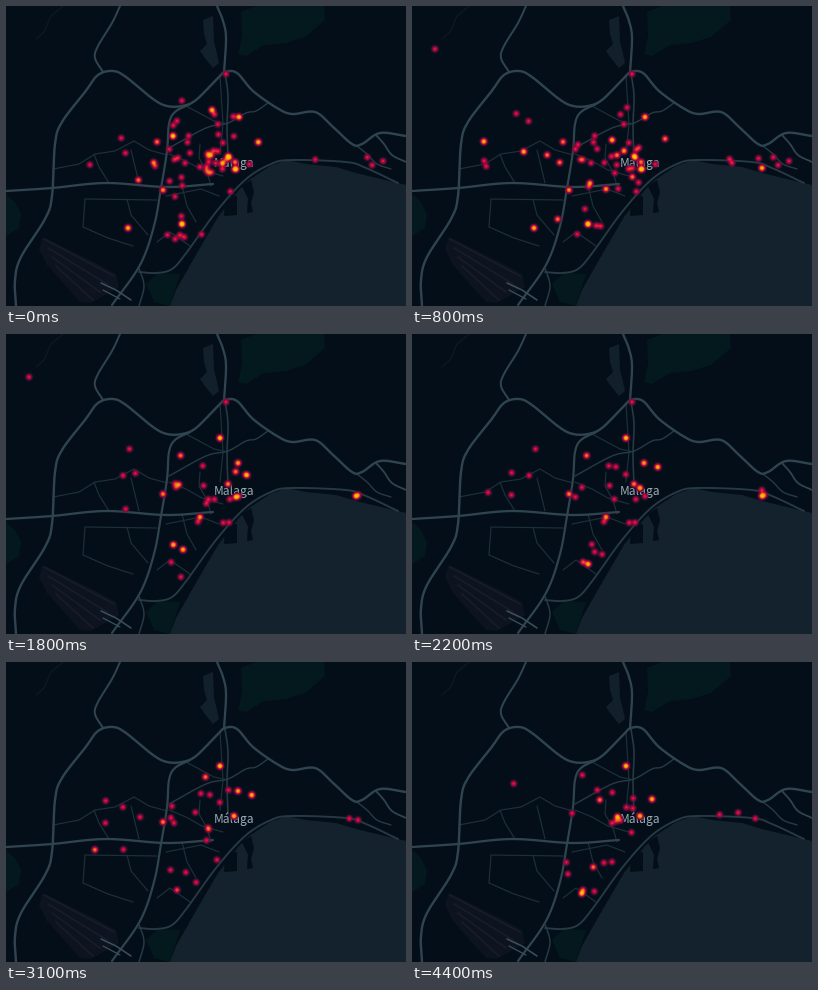
Write a matplotlib script that moves like this. It is 400 by 300 pixels and loops after 4500 ms.

```python
import random

import matplotlib.pyplot as plt
import numpy as np
from matplotlib.animation import FuncAnimation
from matplotlib.colors import LinearSegmentedColormap, to_rgba
from matplotlib.patches import Polygon

W, H, DPI = 400, 300, 100
FRAMES, STEP = 45, 100
PX = 72 / DPI

LAND, SEA, PARK = "#030e18", "#13222d", "#03191d"
MOTORWAY, AVENUE, STREET = "#2f444f", "#263a45", "#1d303a"
PEAK, SIGMA = 2.6, 1.95

random.seed(29)
fig = plt.figure(figsize=(W / DPI, H / DPI), dpi=DPI, facecolor=LAND)
ax = fig.add_axes([0, 0, 1, 1])
ax.set_xlim(0, W)
ax.set_ylim(H, 0)
ax.axis("off")


def smooth(points, n=8):
    """Catmull-Rom curve through the points."""
    p = np.array(points, float)
    p = np.vstack([2 * p[0] - p[1], p, 2 * p[-1] - p[-2]])
    t = np.linspace(0, 1, n, endpoint=False)[:, None]
    parts = []
    for a, b, c, d in zip(p, p[1:], p[2:], p[3:]):
        parts.append(0.5 * (2 * b + (c - a) * t + (2 * a - 5 * b + 4 * c - d) * t**2
                            + (3 * b - a - 3 * c + d) * t**3))
    return np.vstack(parts + [p[-2:-1]])


def area(color, *points):
    ax.add_patch(Polygon(points, closed=True, fc=color, lw=0, zorder=1))


def line(color, width, *points, z=3):
    x, y = np.array(points, float).T
    ax.plot(x, y, color=color, lw=width * PX, solid_capstyle="round",
            solid_joinstyle="round", zorder=z)


def road(color, width, *points):
    line(color, width, *smooth(points))


def street(*points):
    line(STREET, 1.2, *points)


def draw_land():
    area(PARK, (235, 6), (250, 0), (318, 0), (319, 14), (299, 31), (280, 37),
         (258, 39), (240, 50), (232, 48), (236, 30))
    area(PARK, (0, 188), (9, 196), (15, 208), (13, 222), (0, 230))
    area(PARK, (140, 278), (152, 267), (174, 268), (164, 300), (148, 296))
    line("#0f1c26", 1, (30, 33), (38, 26), (45, 10), (57, 0), z=1)
    # reservoir
    area("#11202a", (197, 14), (207, 10), (208, 35), (213, 57), (207, 62),
         (198, 51), (194, 45), (201, 38), (198, 28))
    # airport with its runways
    area("#0d1420", (37, 231), (88, 256), (110, 268), (113, 281), (85, 297),
         (74, 296), (41, 259), (33, 243))
    for k in range(4):
        line("#191d29", 1.6, (38 + 4 * k, 233 + 9 * k), (108 - 7 * k, 270 + 8 * k), z=2)
    area(SEA, (164, 300), (170, 284), (191, 247), (212, 211), (233, 184), (243, 174),
         (264, 160), (281, 154), (300, 158), (330, 161), (350, 167), (400, 179), (400, 300))
    # harbour quays
    area(LAND, (219, 191), (231, 190), (231, 209), (218, 210))
    area(LAND, (236, 180), (245, 174), (248, 186), (245, 197), (247, 206), (241, 207),
         (242, 193))


def draw_roads():
    street((47, 163), (73, 158), (89, 148), (109, 145), (128, 135), (143, 144), (161, 149))
    street((88, 148), (93, 161), (103, 177))
    street((125, 144), (133, 177))
    street((151, 194), (79, 193), (77, 221), (102, 232), (127, 240))
    street((121, 193), (125, 209), (142, 229))
    street((163, 148), (180, 155), (196, 164), (217, 170))
    street((194, 138), (193, 152), (201, 166), (205, 180))
    street((151, 236), (164, 226), (184, 240))
    street((160, 190), (195, 183), (213, 190))
    street((176, 180), (181, 200), (190, 216))
    street((214, 70), (217, 118), (214, 148))
    street((180, 100), (208, 115), (222, 118))
    road(AVENUE, 1.4, (163, 142), (200, 122), (222, 117), (240, 107), (250, 105), (262, 97))
    road(AVENUE, 1.6, (219, 67), (222, 90), (221, 120), (222, 152))
    road(AVENUE, 1.4, (351, 140), (361, 148), (371, 158), (385, 163))
    road(AVENUE, 1.9, (133, 266), (150, 267), (166, 263), (181, 246), (210, 206),
         (239, 174), (265, 158), (286, 154), (340, 156), (360, 162), (392, 177))
    # western ring, then on to the east
    road(MOTORWAY, 2.4, (10, 300), (9, 274), (15, 251), (39, 213), (46, 190),
         (49, 138), (56, 116), (79, 86), (92, 69), (107, 65), (120, 71), (147, 93),
         (161, 100), (176, 100), (190, 94), (211, 73), (219, 66), (231, 67), (247, 85),
         (271, 102), (286, 108), (309, 106), (326, 120), (346, 138), (356, 138),
         (374, 127), (400, 130))
    road(MOTORWAY, 2, (114, 0), (106, 17), (92, 40), (89, 52), (97, 66))
    road(MOTORWAY, 2.3, (211, 0), (217, 15), (220, 32), (218, 67))
    road(MOTORWAY, 2.3, (0, 185), (46, 182), (100, 177), (160, 181), (207, 178))
    road(MOTORWAY, 2.2, (184, 98), (169, 106), (163, 118), (161, 145), (155, 182),
         (148, 220), (134, 259), (106, 299))
    road(MOTORWAY, 1.8, (370, 129), (378, 138), (386, 149), (400, 156))
    line("#3a4f59", 1.6, (95, 277), (110, 284), (125, 294))
    line("#3a4f59", 1.3, (97, 284), (114, 293))
    road(AVENUE, 1.5, (133, 262), (138, 280), (133, 300))


# lasting hubs: x, y, heat, first and last step
HUBS = [
    (220, 68, 1.0, 0, 22), (222, 150, 1.7, 0, 24), (230, 163, 2.2, 0, 21),
    (233, 111, 2.2, 0, 14), (214, 104, 2.4, 15, 44), (232, 129, 2.0, 16, 39),
    (350, 162, 2.2, 4, 28), (122, 222, 2.2, 0, 12), (157, 184, 1.8, 0, 8),
    (167, 130, 2.6, 0, 6), (176, 218, 3.0, 0, 9), (194, 183, 1.9, 8, 28),
    (178, 177, 1.8, 4, 14), (228, 154, 2.2, 22, 44), (23, 43, 1.0, 8, 21),
    (157, 160, 1.7, 15, 31), (171, 228, 1.3, 20, 44), (206, 104, 2.2, 0, 3),
]

# share of the traffic, then centre and spread
DISTRICTS = [
    (0.42, 211, 150, 17, 21),
    (0.18, 176, 218, 12, 13),
    (0.20, 115, 155, 27, 30),
    (0.10, 335, 156, 30, 4),
    (0.10, 168, 145, 6, 20),
]


def crowd(i):
    """Number of passing spots: busy at first, thinning out in the second second."""
    return 24 + 34 / (1 + np.exp((i - 12) / 2))


def at_sea(x, y):
    return y > max(300 - 1.6 * (x - 160), 161)


def place():
    while True:
        _, cx, cy, sx, sy = random.choices(DISTRICTS, [d[0] for d in DISTRICTS])[0]
        x, y = random.gauss(cx, sx), random.gauss(cy, sy)
        if not at_sea(x, y):
            return x, y


def make_spots():
    spots = [(*hub, -1) for hub in HUBS]
    for rank in range(60):
        start = -random.randint(0, 8)
        while start < FRAMES:
            end = start + random.randint(5, 13)
            heat = random.choices([1, 1.6, 2.2], [10, 1.5, 1])[0]
            spots.append((*place(), heat, start, end, rank))
            start = end + 1
    return np.array(spots, float).T


heat_map = LinearSegmentedColormap.from_list("heat", [
    (0.00, to_rgba("#5a1846", 0.0)),
    (0.04, to_rgba("#5a1846", 0.2)),
    (0.11, to_rgba("#6a1040", 0.75)),
    (0.20, to_rgba("#900c3f", 0.95)),
    (0.30, to_rgba("#c70039")),
    (0.40, to_rgba("#e0283c")),
    (0.52, to_rgba("#e3611c")),
    (0.66, to_rgba("#f1920e")),
    (0.90, to_rgba("#ffc300")),
    (1.00, to_rgba("#ffc300")),
])

X, Y, HEAT, START, END, RANK = make_spots()


def bell(size, centers):
    cells = np.arange(size) + 0.5
    return np.exp(-((cells - centers[:, None]) ** 2) / (2 * SIGMA**2))


GX, GY = bell(W, X), bell(H, Y)


def heat_layer(i):
    live = HEAT * ((START <= i) & (i <= END) & (RANK < crowd(i)))
    return heat_map(np.clip((GY * live[:, None]).T @ GX / PEAK, 0, 1))


draw_land()
draw_roads()
ax.text(228, 161.5, "Málaga", ha="center", va="baseline", color="#9aabb4",
        family="Noto Sans CJK JP", fontsize=12 * PX, zorder=4)
layer = ax.imshow(heat_layer(0), extent=(0, W, H, 0), interpolation="nearest",
                  aspect="auto", zorder=5)


def update(i):
    layer.set_data(heat_layer(i))
    return [layer]


anim = FuncAnimation(fig, update, frames=FRAMES, interval=STEP, repeat=True,
                     repeat_delay=0, blit=False)
plt.show()
```
